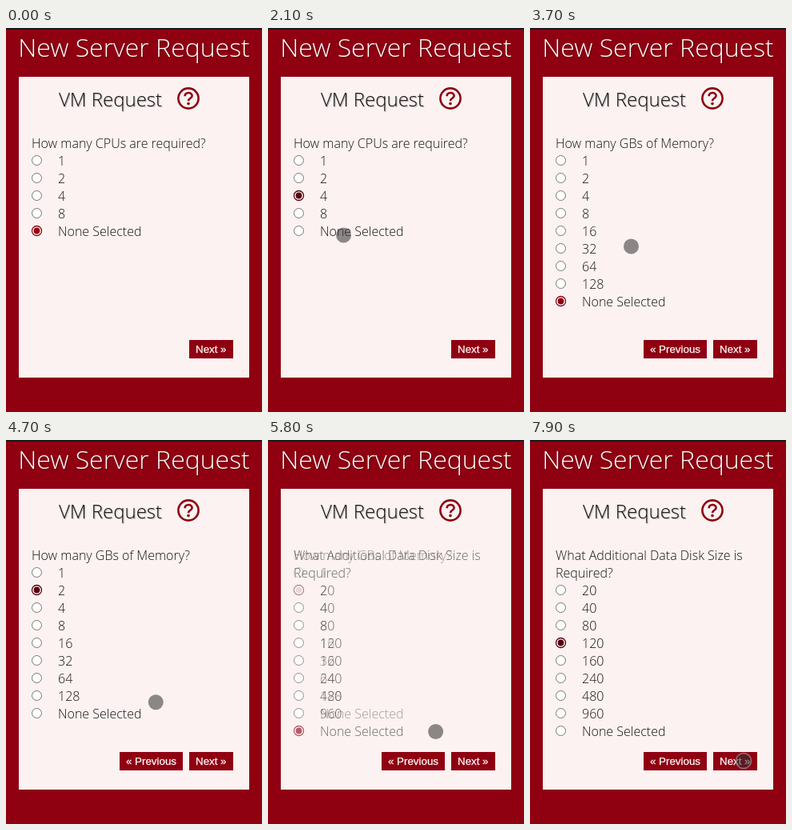
These frames come from a looping animation (320 by 480 pixels, 8000 ms). An HTML page:

```html
<!DOCTYPE html>
<html lang="en">
<head>
<meta charset="utf-8">
<title>New Server Request</title>
<style>
  html, body { margin: 0; width: 100%; height: 100%; overflow: hidden; background: #8f0011; }
  svg { display: block; width: 100%; height: 100%; }
  text { font: 300 16px "Open Sans", "Noto Sans", sans-serif; fill: #161314; white-space: pre; }
  .title { font-size: 32px; fill: #fff; text-anchor: middle; text-shadow: 1px 1px 1px rgba(0, 0, 0, .35); }
  .heading { font-size: 24px; text-anchor: middle; text-shadow: 1px 1px 1px rgba(0, 0, 0, .3); }
  .button text { font: 13.333px "Liberation Sans", Arial, sans-serif; fill: #fff; stroke: #fff; stroke-width: .25; }
</style>
</head>
<body>
<svg id="stage" viewBox="0 0 320 480">
  <rect width="320" height="480" fill="#8f0011"/>
  <rect width="320" height="2" fill="#1d171f"/>
  <text class="title" x="160" y="36">New Server Request</text>
  <rect x="16" y="61" width="288" height="376" fill="#fbf2f1"/>
  <text class="heading" x="130.5" y="98">VM Request</text>
  <g fill="none" stroke="#8f0011" stroke-width="2.6">
    <circle cx="228" cy="88" r="12.6"/>
    <path d="M223.6 85.2C223.8 79.6 232.6 79.7 232.6 84.8C232.6 88 228 87.6 228 91.2"/>
    <circle cx="228" cy="94.6" r="1.8" fill="#8f0011" stroke="none"/>
  </g>
  <g id="pages"></g>
  <g id="previous" class="button">
    <rect x="142" y="390" width="79" height="23" fill="#8f0011"/>
    <text x="150" y="406">« Previous</text>
  </g>
  <g class="button">
    <rect id="next" x="229" y="390" width="55" height="23"/>
    <text x="237" y="406">Next »</text>
  </g>
  <circle id="cursor" r="9.5" fill="rgb(50,48,48)" fill-opacity=".55" stroke="rgb(160,145,145)" stroke-opacity=".75"/>
</svg>
<script>
const LOOP = 8000, FADE = 520;
const byId = id => document.getElementById(id);

function add(parent, tag, attrs, content = "") {
  const node = document.createElementNS("http://www.w3.org/2000/svg", tag);
  for (const key in attrs) node.setAttribute(key, attrs[key]);
  node.textContent = content;
  parent.append(node);
  return node;
}

// pick: option chosen at time `picked`; start: when the page begins to fade in
const pages = [
  { question: ["How many CPUs are required?"], options: [1, 2, 4, 8],
    pick: 2, picked: 1600, start: -FADE, pressed: 1400 },
  { question: ["How many GBs of Memory?"], options: [1, 2, 4, 8, 16, 32, 64, 128],
    pick: 1, picked: 4200, start: 3020, pressed: 4050 },
  { question: ["What Additional Data Disk Size is", "Required?"],
    options: [20, 40, 80, 120, 160, 240, 480, 960],
    pick: 3, picked: 7100, start: 5480, pressed: 6800 }
];

// Cursor moves: start, end, from, to
const moves = [
  [800, 1400, [-12, 290], [38, 210]],
  [1750, 2800, [38, 210], [255, 398]],
  [3250, 4050, [255, 398], [39, 188]],
  [4300, 4960, [39, 188], [264, 400]],
  [5400, 6650, [264, 400], [40, 254]],
  [7150, 7750, [40, 254], [267, 401]]
];
const nextTaps = [[2850, 3200], [5000, 5350]];
const presses = [...nextTaps, [7780, LOOP], ...pages.map(p => [p.pressed, p.picked])];

for (const page of pages) {
  page.group = add(byId("pages"), "g", {});
  page.question.forEach((line, i) => add(page.group, "text", { x: 32, y: 150 + 22 * i }, line));
  page.radios = [...page.options, "None Selected"].map((label, i) => {
    const y = 143.5 + 22 * (i + page.question.length);
    add(page.group, "text", { x: 65, y: y + 6.5 }, label);
    return {
      ring: add(page.group, "circle", { cx: 38.5, cy: y, r: 6 }),
      dot: add(page.group, "circle", { cx: 38.5, cy: y, r: 3.9 })
    };
  });
}

const clamp = v => Math.min(1, Math.max(0, v));
const ease = v => v * v * (3 - 2 * v);
const during = (t, spans) => spans.some(([from, to]) => t >= from && t < to);

function drawPage(page, i, t) {
  const following = pages[i + 1];
  const shown = clamp((t - page.start) / FADE);
  const hidden = following ? clamp((t - following.start) / FADE) : 0;
  page.group.setAttribute("opacity", shown * (1 - hidden));

  const chosen = t >= page.picked ? page.pick : page.radios.length - 1;
  const focused = t >= page.picked && !(following && t >= following.start);
  const color = focused ? "#560010" : "#8f0011";
  page.radios.forEach(({ ring, dot }, n) => {
    const on = n === chosen;
    const held = n === page.pick && during(t, [[page.pressed, page.picked]]);
    ring.setAttribute("stroke", on ? color : held ? "#333" : "#767676");
    ring.setAttribute("stroke-width", on ? 1.3 : 1);
    ring.setAttribute("fill", held ? "#c4bebe" : "#fff");
    dot.setAttribute("fill", on ? color : "none");
  });
}

function draw(t) {
  pages.forEach((page, i) => drawPage(page, i, t));
  byId("previous").setAttribute("visibility", t >= pages[1].start ? "visible" : "hidden");
  byId("next").setAttribute("fill", during(t, nextTaps) ? "#78444e" : "#8f0011");

  const [from, to, a, b] = moves.filter(m => m[0] <= t).pop() || moves[0];
  const k = ease(clamp((t - from) / (to - from)));
  const cursor = byId("cursor");
  cursor.setAttribute("cx", a[0] + (b[0] - a[0]) * k);
  cursor.setAttribute("cy", a[1] + (b[1] - a[1]) * k);
  cursor.setAttribute("stroke-width", during(t, presses) ? 1.6 : 0);
}

const begin = performance.now();
function frame() {
  draw((performance.now() - begin) % LOOP);
  requestAnimationFrame(frame);
}
frame();
</script>
</body>
</html>
```
